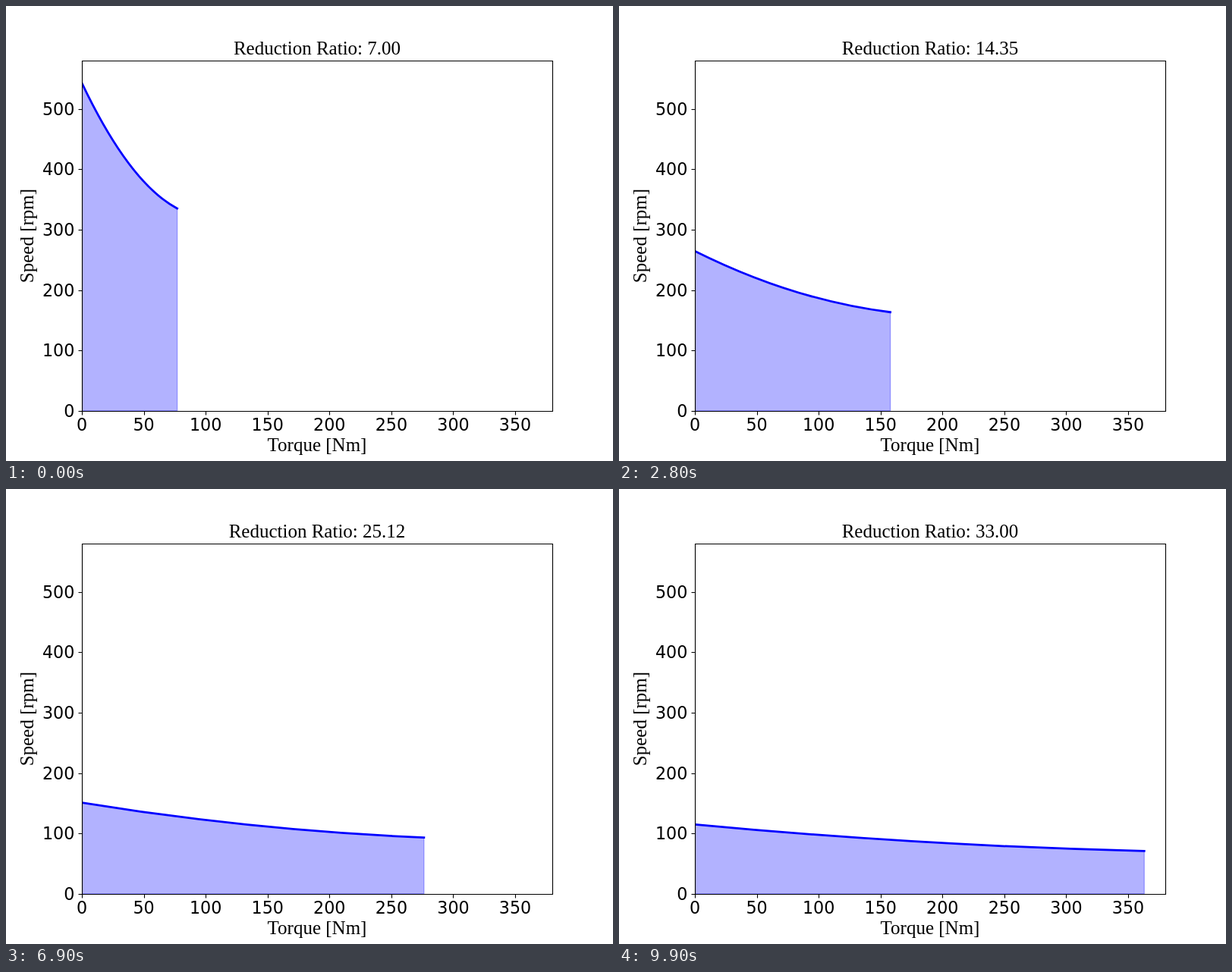
Write an HTML page that moves like this. It is 800 px wide and 600 px high and loops after 10 s.

```html
<!DOCTYPE html>
<html lang="en">
<head>
<meta charset="utf-8">
<title>Torque and speed by reduction ratio</title>
<style>
  html, body { margin: 0; width: 100%; height: 100%; overflow: hidden; background: #fff; }
  svg { display: block; }
  text { text-anchor: middle; }
  .label { font: 25px "Liberation Serif", "Times New Roman", serif; }
  #ticks { font: 22.22px "DejaVu Sans", sans-serif; }
  #ticks path, #frame { fill: none; stroke: #000; stroke-width: 1.11; }
  #area { fill: #00f; fill-opacity: .3; stroke: #00f; stroke-opacity: .3; stroke-width: 1.39; }
  #curve { fill: none; stroke: #00f; stroke-width: 2.78; stroke-linecap: square; }
</style>
</head>
<body>
<svg width="800" height="600" viewBox="0 0 800 600">
  <svg x="100" y="72" width="620" height="462">
    <path id="area"/>
    <path id="curve"/>
  </svg>
  <path id="frame" d="M100.5 72.5H720.5V534.5H100.5Z"/>
  <g id="ticks"></g>
  <text id="title" class="label" x="410" y="64"></text>
  <text class="label" x="410" y="587">Torque [Nm]</text>
  <text class="label" transform="translate(36 303) rotate(-90)">Speed [rpm]</text>
</svg>
<script>
const $ = id => document.getElementById(id);
const FRAMES = 100, STEP = 100;
const RATIO_MIN = 7, RATIO_MAX = 33;

// Motor-side values: peak torque and the quadratic speed curve's Bezier points
const TORQUE = 11, RPM_START = 3800, RPM_MID = 2639, RPM_END = 2347;

const px = torque => torque * 620 / 380;
const py = rpm => 462 - rpm * 462 / 580;
const snap = v => Math.round(v) + .5;

function drawTicks() {
  let out = '';
  for (let v = 0; v <= 350; v += 50) {
    const x = 100 + px(v);
    out += `<path d="M${snap(x)} 534.5v5"/><text x="${x}" y="560">${v}</text>`;
  }
  for (let v = 0; v <= 500; v += 100) {
    const y = 72 + py(v);
    out += `<path d="M100.5 ${snap(y)}h-5"/>` +
      `<text x="90.3" y="${Math.round(y + 8)}" style="text-anchor:end">${v}</text>`;
  }
  $('ticks').innerHTML = out;
}

function draw(frame) {
  const ratio = RATIO_MIN + (RATIO_MAX - RATIO_MIN) * frame / (FRAMES - 1);
  const x = px(TORQUE * ratio);
  const [y0, y1, y2] = [RPM_START, RPM_MID, RPM_END].map(rpm => py(rpm / ratio));
  const curve = `M0 ${y0}Q${x / 2} ${y1} ${x} ${y2}`;
  $('curve').setAttribute('d', curve);
  $('area').setAttribute('d', `${curve}V462H0Z`);
  $('title').textContent = `Reduction Ratio: ${ratio.toFixed(2)}`;
}

const start = performance.now();
function tick() {
  draw(Math.floor((performance.now() - start) / STEP) % FRAMES);
  requestAnimationFrame(tick);
}

drawTicks();
tick();
</script>
</body>
</html>
```
